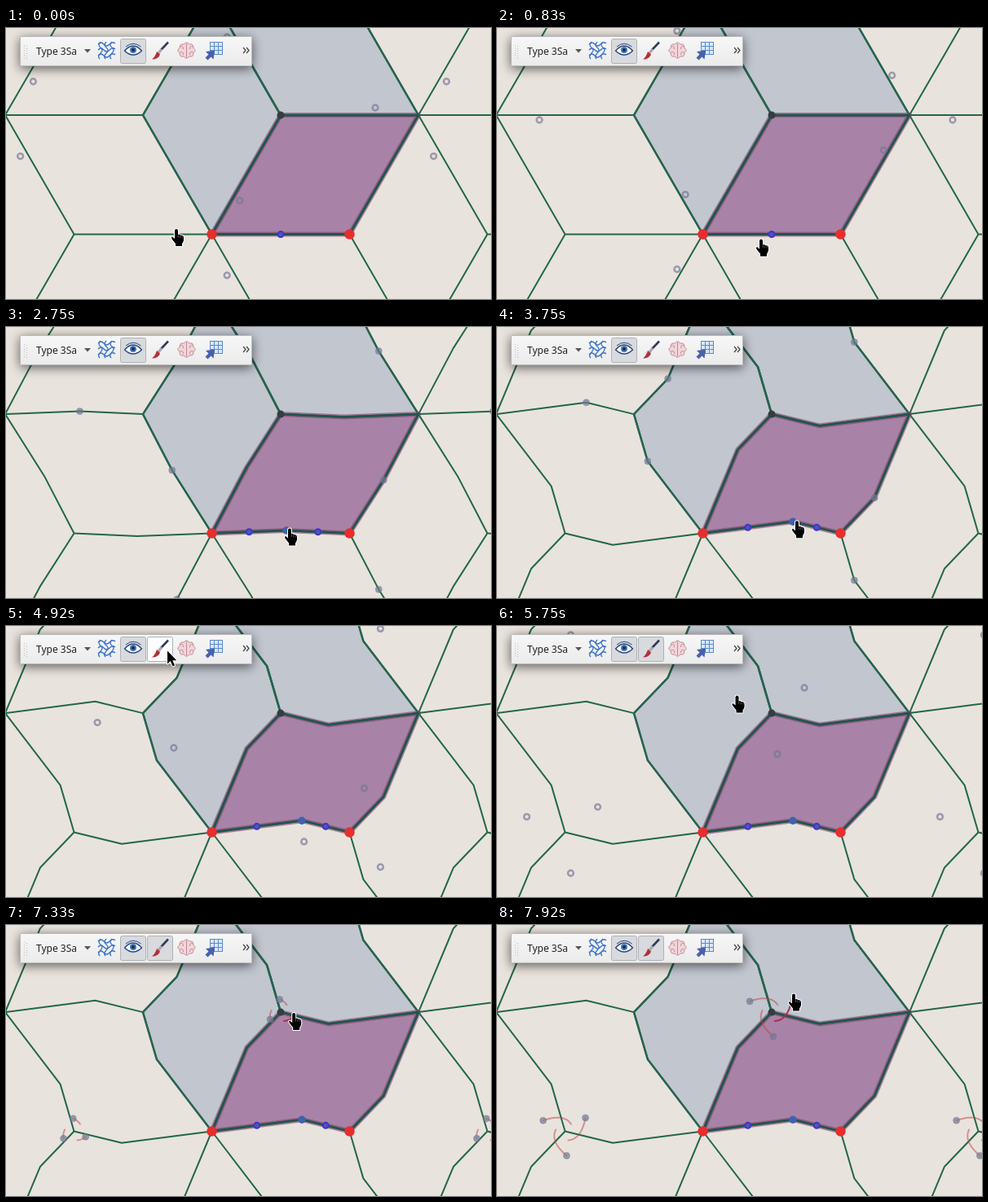
Animation, 595 px wide and 333 px high, one loop 8 s. Source, as an HTML page with a canvas:

```html
<!DOCTYPE html>
<html>
<head>
<meta charset="utf-8">
<style>
html, body { margin: 0; width: 595px; height: 333px; overflow: hidden; background: #e9e3dd; }
canvas { display: block; }
</style>
</head>
<body>
<canvas id="stage" width="595" height="333"></canvas>
<script>
const g = document.getElementById('stage').getContext('2d');
const LOOP = 8000, STEP = 1000 / 12;
const A = [252.5, 253.5], B = [421.5, 253.5], C = [506, 107.1], D = [337, 107.1];
const MID = [337, 253.5];
const DRAG = 31, DROP = 45, ENTER = 57, PICK = 61, PAINT = 84, LAST = 95;

// Moves: first step, last step, end x, end y; at rest in between
const POINTER = [
  [0, 7, 297, 259], [9, 10, 305.5, 259.4], [10, 19, 334, 254.6],
  [30, 33, 344, 250], [36, 37, 350, 246], [40, 41, 357, 242], [44, 45, 363, 239.2],
  [48, 57, 186, 53], [65, 67, 250, 60], [67, 72, 350, 130],
  [79, 80, 346.8, 126.7], [80, 83, 341, 118]
];
// Drawn cursor tip relative to the pointer
const OFFSET = [
  [0, 7, 8, 1], [9, 10, 18.5, 0], [10, 19, 4, -2.6], [44, 45, 5, -1],
  [48, 57, 15, -18], [58, 59, 12, -22.5], [62, 63, 48, -19],
  [65, 67, 5, -2], [67, 80, 2, -6]
];

function follow(moves, [x, y], n) {
  for (const [from, to, ex, ey] of moves) {
    if (n <= from) break;
    const u = Math.min(1, (n - from) / (to - from));
    x += (ex - x) * u;
    y += (ey - y) * u;
  }
  return [x, y];
}

function pointer(n) {
  if (n <= PAINT) return follow(POINTER, [199.5, 244.4], n);
  const u = (n - PAINT) / (LAST - PAINT), v = 1 - u;
  const bend = (a, b, c) => v * v * a + 2 * u * v * b + u * u * c;
  return [bend(341, 357, 362), bend(118, 117, 90.5)];
}

function turn([x, y], [cx, cy], deg) {
  const r = deg * Math.PI / 180, c = Math.cos(r), s = Math.sin(r);
  x -= cx; y -= cy;
  return [cx + c * x - s * y, cy + s * x + c * y];
}

// Visible translations of the hexagonal lattice
const cells = [];
for (let i = -2; i <= 2; i++)
  for (let j = -3; j <= 3; j++)
    if ((i + j) % 2 === 0) cells.push([i * 253.5, j * 146.4]);

function eachCopy(points, order, draw) {
  for (const [dx, dy] of cells)
    for (let k = 0; k < order; k++)
      draw(points.map(p => {
        const [x, y] = turn(p, A, 360 / order * k);
        return [x + dx, y + dy];
      }), !k && !dx && !dy);
}

function trace(points, closed) {
  g.beginPath();
  points.forEach(p => g.lineTo(...p));
  if (closed) g.closePath();
}

function stroke(color, width) {
  g.strokeStyle = color;
  g.lineWidth = width;
  g.stroke();
}

function fill(color) {
  g.fillStyle = color;
  g.fill();
}

function dot([x, y], r, color, rim, width = 2) {
  g.beginPath();
  g.arc(x, y, r, 0, 7);
  if (color) fill(color);
  if (rim) stroke(rim, width);
}

function line(d, color, width) {
  g.strokeStyle = color;
  g.lineWidth = width;
  g.stroke(new Path2D(d));
}

function shape(d, color) {
  g.fillStyle = color;
  g.fill(new Path2D(d));
}

function tiling(X) {
  const opposite = [A[0] + C[0] - X[0], A[1] + C[1] - X[1]];
  const tile = [A, X, B, turn(X, B, 120), C, opposite, D, turn(X, A, -60)];
  const around = [120, 240].map(deg => tile.map(p => turn(p, D, deg)));
  for (const t of around) {
    trace(t, true);
    fill('#c2c6cf');
    stroke('#c2c6cf', 1);
  }
  trace(tile, true);
  fill('#a883a7');
  eachCopy([A, X, B], 6, edge => {
    trace(edge);
    stroke('#226848', 2);
  });
  for (const t of around) {
    trace(t, true);
    stroke('#27644f', 2.5);
  }
  trace(tile, true);
  stroke('rgba(126,70,105,.62)', 6);
  stroke('#21544f', 2.8);
}

function handles(X, edited) {
  dot(D, 4.5, '#343d40');
  const half = p => [(p[0] + X[0]) / 2, (p[1] + X[1]) / 2];
  for (const p of edited ? [half(A), half(B)] : [MID]) dot(p, 3.5, '#5552b8', '#3a38c8');
  if (edited) dot(X, 4.7, '#3e62ae');
  dot(A, 6.2, '#e62e2d');
  dot(B, 6.2, '#e62e2d');
}

function button(x, color) {
  g.beginPath();
  g.roundRect(x + .5, 13.5, 31, 30, 2);
  fill(color);
  stroke('#b0b1b4', 1);
}

function panel() {
  g.save();
  g.shadowColor = 'rgba(0,0,0,.6)';
  g.shadowBlur = 14;
  g.shadowOffsetY = 3;
  const sheen = g.createLinearGradient(0, 10, 0, 47);
  sheen.addColorStop(0, '#f7f7f7');
  sheen.addColorStop(1, '#ebebeb');
  g.fillStyle = sheen;
  g.fillRect(17, 10, 285, 37);
  g.restore();
  g.strokeStyle = '#b9b9b9';
  g.lineWidth = 1;
  g.strokeRect(17.5, 10.5, 284, 36);
  g.fillStyle = '#bdbdbd';
  for (let y = 21; y < 37; y += 3) {
    g.fillRect(22, y, 1, 1);
    g.fillRect(25, y + 1, 1, 1);
  }
  g.fillStyle = '#222';
  g.font = '12px "Noto Sans", "Open Sans", sans-serif';
  g.fillText('Type 3Sa', 37, 33);
  shape('M96 26h8l-4 4.5z', '#555');
  for (const x of [291, 295]) line(`M${x} 24l3 3.5l-3 3.5`, '#444', 1.2);
}

function icons(n) {
  for (const s of [0, 7, 14]) {
    line(`M113 ${20 + s}q3.5 -4 7 0t7 0t7 -1`, '#3d73c6', 1.3);
    line(`M${116 + s} 17q-4 4 0 7t0 7t-1 7`, '#3d73c6', 1.3);
  }

  button(140, '#d9dade');
  const eye = 'M145.5 28q10.5 -12 21 0q-10.5 10 -21 0z';
  shape(eye, '#fff');
  line(eye, '#27477f', 1.4);
  line('M147 23q9 -7.5 18.5 0', '#27477f', 1);
  dot([156, 27], 4, '#4778b8');
  dot([156, 27], 2, '#172b50');

  if (n >= ENTER) button(173, n >= PICK ? '#d9dade' : '#fcfcfc');
  line('M199 17.5L190 27', '#303c5c', 2.6);
  line('M191 26L187 31', '#a7a9ad', 3.2);
  shape('M185 29l4 3.5q-2 6 -10 6q4 -3 6 -9.5z', '#b52e36');

  // Brain: scalloped disc with folds
  g.beginPath();
  for (let a = 0; a < 6.29; a += .05) {
    const r = 9.4 + .7 * Math.cos(8 * a);
    g.lineTo(221.5 + 1.05 * r * Math.cos(a), 27.5 + .95 * r * Math.sin(a));
  }
  fill('#f2d5da');
  stroke('#b77d89', 1);
  line('M221.5 19v17', '#c28b96', 1);
  for (const s of [-1, 1])
    for (const y of [23, 30])
      line(`M${221.5 + 8 * s} ${y}q${-4 * s} -2 ${-4 * s} 3`, '#c28b96', 1);

  shape('M250 17h16v16h-16z', '#dbe7f7');
  for (const s of [0, 5, 10, 15])
    line(`M${250.5 + s} 17v16M250 ${17.5 + s}h16`, '#5b8bc9', 1);
  shape('M245 29l11 -1.5l-1.5 11l-3 -3l-4 4l-3 -3l4 -4z', '#4961ad');
}

const HAND = new Path2D('M-2 2Q-2 0 0 0Q2 0 2 2V7Q4 6 5 7.5Q9 7.5 9 10.5V14Q8 17 7 18V21H-1V18L-5 13Q-7 10 -5 9.5L-2 12Z');
const ARROW = new Path2D('M0 0V16L3.7 12.5L6.5 19L9 18L6.3 11.7H11.3Z');

function cursor([x, y]) {
  const onBar = x > 17 && x < 302 && y < 47;
  const path = onBar ? ARROW : HAND;
  g.save();
  g.translate(x, y);
  g.strokeStyle = '#fff';
  g.lineWidth = 2;
  g.stroke(path);
  g.fillStyle = '#000';
  g.fill(path);
  if (!onBar) line('M2.3 7.5v3M4.8 8v3M7.3 9v2', '#999', .6);
  g.restore();
}

function render(n) {
  const hot = pointer(n), [dx, dy] = follow(OFFSET, [9.5, 2.6], n);
  const edited = n >= DRAG;
  const X = edited ? pointer(Math.min(n, DROP)) : MID;
  const pressed = edited && n < 49 || n > PAINT;
  g.fillStyle = '#e9e3dd';
  g.fillRect(0, 0, 595, 333);
  g.lineJoin = 'round';
  tiling(X);

  if (n > PAINT) {
    const path = [];
    for (let i = PAINT; i <= n; i += .5) path.push(pointer(i));
    g.lineCap = 'round';
    eachCopy(path, 3, (points, own) => {
      trace(points);
      stroke(own ? '#a92f49' : 'rgba(190,65,65,.5)', 2);
    });
    g.lineCap = 'butt';
  }

  handles(X, edited);
  eachCopy([hot], 3, ([p], own) => {
    if (own) return;
    if (pressed) dot(p, 4, 'rgba(112,122,148,.7)', 'rgba(105,112,140,.4)', 1);
    else dot(p, 3.4, null, 'rgba(116,118,150,.68)', 2.5);
  });
  panel();
  icons(n);
  cursor([hot[0] + dx, hot[1] + dy]);
}

const start = performance.now();
function tick() {
  const t = (performance.now() - start) % LOOP;
  render(Math.min(LAST, Math.floor((t + 4) / STEP)));
  requestAnimationFrame(tick);
}
tick();
</script>
</body>
</html>
```
